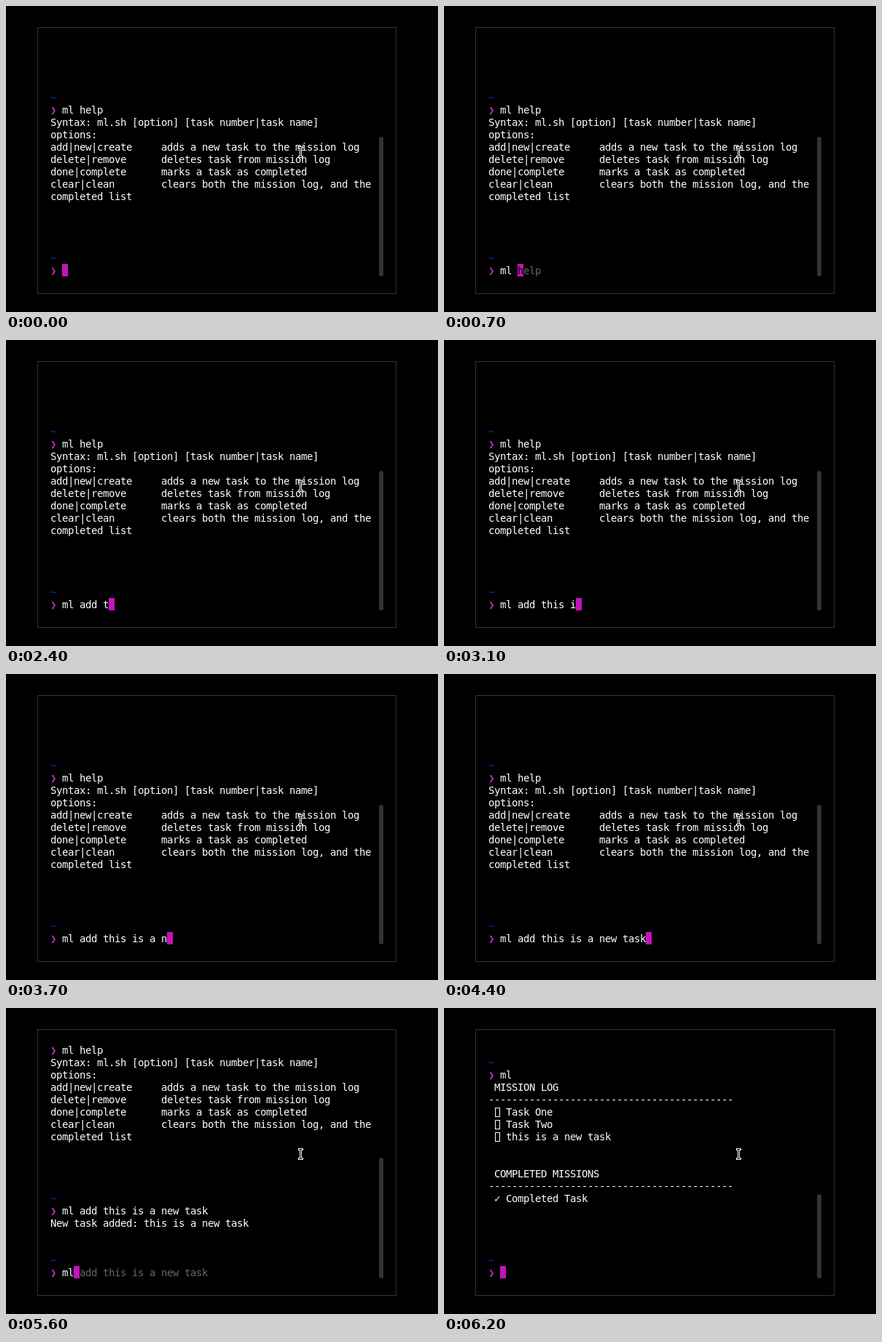
An HTML page with a canvas that plays this animation: 593 by 421 pixels, repeating every 8000 ms.

```html
<!DOCTYPE html>
<html lang="en">
<head>
<meta charset="utf-8">
<title>Mission log terminal</title>
<style>
html, body { margin: 0; height: 100%; overflow: hidden; background: #000; }
canvas { display: block; }
</style>
</head>
<body>
<canvas id="stage" width="593" height="421"></canvas>
<script>
const ctx = document.getElementById('stage').getContext('2d');
const LOOP = 8000, LEFT = 61, TOP = 49, CELL = 8, LINE = 17, LAST = 18;
const WHITE = '#fff', BLUE = '#1030c0', PINK = '#c42fc4', BLOCK = '#c414b8', GHOST = '#666', GREY = '#333';

const command = 'ml add this is a new task';
const help = [
  'Syntax: ml.sh [option] [task number|task name]',
  'options:',
  'add|new|create     adds a new task to the mission log',
  'delete|remove      deletes task from mission log',
  'done|complete      marks a task as completed',
  'clear|clean        clears both the mission log, and the',
  'completed list'
];
const dashes = '-'.repeat(42);
const log = [
  ' MISSION LOG', dashes, ' \u25af Task One', ' \u25af Task Two', ' \u25af this is a new task',
  '', '', ' COMPLETED MISSIONS', dashes, ' \u2713 Completed Task'
];

// [time, number of typed characters]
const keys = [
  [0, 0], [500, 2], [700, 3], [800, 4], [900, 5], [1100, 6], [1200, 7],
  [2400, 8], [2600, 10], [2900, 11], [3100, 13], [3300, 14], [3400, 16], [3500, 17],
  [3700, 18], [3800, 19], [3900, 21], [4100, 22], [4200, 23], [4300, 24], [4400, 25],
  [4600, 0], [5500, 1], [5600, 2], [6200, 0]
];

function rect(color, x, y, w, h) {
  ctx.fillStyle = color;
  ctx.fillRect(x, y, w, h);
}

function write(text, col, row, color = WHITE) {
  [...text].forEach((ch, i) => {
    const x = LEFT + (col + i) * CELL, y = TOP + row * LINE;
    if (ch === '\u25af') {
      ctx.strokeStyle = color;
      ctx.strokeRect(x + 1.5, y + 3.5, 6, 12);
    } else if (ch !== ' ') {
      ctx.fillStyle = color;
      ctx.fillText(ch, x, y + 14);
    }
  });
}

function prompt(row, text) {
  if (row > 0) write('~', 0, row - 1, BLUE);
  write('\u276f', 0, row, PINK);
  write(text, 2, row);
}

const lines = (list, row) => list.forEach((text, i) => write(text, 0, row + i));

function input(typed, hint) {
  prompt(LAST, typed);
  const col = 2 + typed.length;
  write(hint, col, LAST, GHOST);
  rect(BLOCK, LEFT + col * CELL, TOP + LAST * LINE, CELL, LINE);
  write(hint.slice(0, 1), col, LAST, '#000');
}

function scrollbar(top) {
  ctx.fillStyle = GREY;
  ctx.beginPath();
  ctx.roundRect(512, top, 6, 372 - top, 3);
  ctx.fill();
}

// White I-beam with a thin black core
function pointer() {
  rect(WHITE, 401, 193, 7, 3);
  rect(WHITE, 401, 206, 7, 3);
  rect(WHITE, 403, 195, 3, 12);
  rect('#000', 402, 194, 5, 1);
  rect('#000', 402, 207, 5, 1);
  rect('#000', 404, 194, 1, 14);
}

function draw(t) {
  rect('#000', 0, 0, 593, 421);
  ctx.lineWidth = 1;
  ctx.strokeStyle = GREY;
  ctx.strokeRect(43.5, 29.5, 492, 366);
  ctx.font = '14px "DejaVu Sans Mono", monospace';

  const count = keys.findLast(k => k[0] <= t)[1];
  const typed = command.slice(0, count);
  let hint = '';
  if (t < 6200) {
    const row = t < 4600 ? 5 : 0;
    prompt(row, 'ml help');
    lines(help, row + 1);
  }
  if (t < 4600) {
    if (t >= 500 && t < 800) hint = 'ml help'.slice(count);
    scrollbar(180);
  } else if (t < 6200) {
    prompt(13, command);
    write('New task added: this is a new task', 0, 14);
    if (t >= 5500 && t < 6100) hint = command.slice(count);
    scrollbar(206);
  } else {
    prompt(2, 'ml');
    lines(log, 3);
    scrollbar(256);
  }
  input(typed, hint);
  pointer();
}

const start = performance.now();
function tick() {
  draw((performance.now() - start) % LOOP);
  requestAnimationFrame(tick);
}
tick();
</script>
</body>
</html>
```
